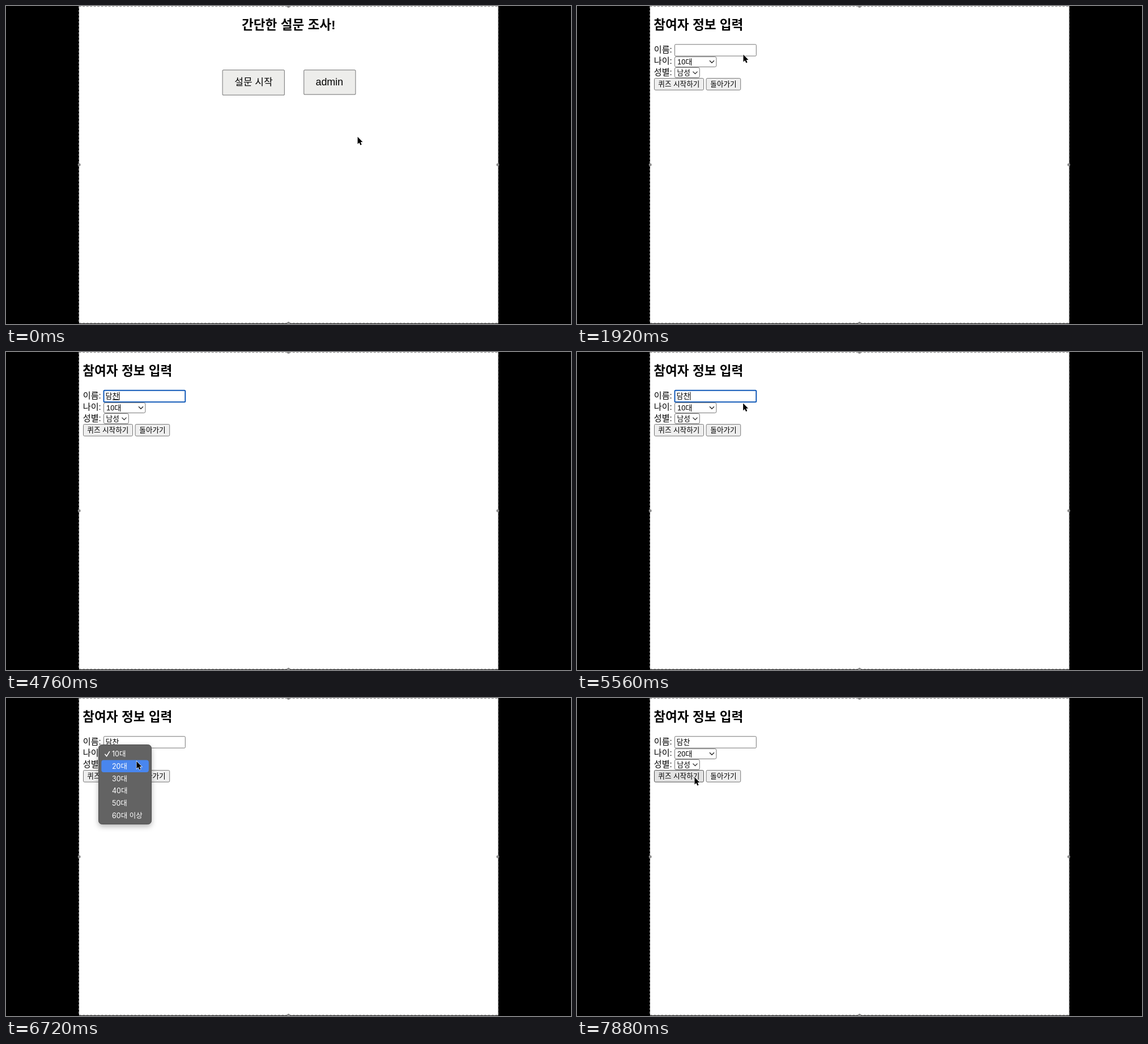
Recreate the animation shown at these times as an HTML page. Size 997 px wide and 561 px high, loop 8000 ms.

```html
<!DOCTYPE html>
<html lang="ko">
<head>
<meta charset="utf-8">
<title>설문 조사</title>
<style>
html, body { margin: 0; width: 100%; height: 100%; overflow: hidden; background: #000; }
svg { display: block; width: 997px; height: 561px; }
text { font-family: "Liberation Sans", "Noto Sans CJK KR", "Noto Sans CJK JP", sans-serif; white-space: pre; }
.head { font-size: 22.6px; font-weight: 700; }
.label { font-size: 15.1px; }
.big { font-size: 17px; }
.small { font-size: 12.6px; }
.num { font-size: 13px; }
.btn { fill: #efefef; stroke: #767676; }
.bigbtn { fill: #ededeb; stroke: #8a8a8a; stroke-width: 1.2; }
.btn.hover, .bigbtn.hover { fill: #e3e3e3; stroke: #505050; }
.btn.press, .bigbtn.press { fill: #f5f5f5; stroke: #8d8d8d; }
.field { fill: #fff; stroke: #767676; }
.field.ring { stroke: #1059b8; stroke-width: 2; }
.chev { fill: none; stroke: #222; stroke-width: 1.3; }
.frame { fill: none; stroke: #989898; stroke-width: 1.3; stroke-dasharray: 4 2.5; }
#menu rect.panel { fill: #636363; stroke: #505050; filter: drop-shadow(0 4px 5px rgba(0,0,0,.28)); }
#menu text { font-family: Inter, "Noto Sans CJK KR", "Noto Sans CJK JP", sans-serif; font-size: 12.5px; fill: #fff; }
</style>
</head>
<body>
<svg viewBox="0 0 997 561">
  <rect x="129" width="739.5" height="560" fill="#fff"/>
  <rect class="frame" x="128.7" y=".5" width="739.8" height="559"/>
  <g fill="#8c8c8c">
    <circle cx="498.5" cy=".5" r="2.5"/><circle cx="498.5" cy="559.5" r="2.5"/>
    <circle cx="129.2" cy="280" r="2.5"/><circle cx="867.8" cy="280" r="2.5"/>
  </g>

  <g id="home">
    <text class="head" x="416" y="41">간단한 설문 조사!</text>
    <rect id="start" class="bigbtn" x="382.1" y="112.8" width="109.3" height="44.4" rx="2"/>
    <text class="big" x="403.3" y="140">설문 시작</text>
    <rect class="bigbtn" x="525.6" y="112.8" width="91.2" height="43.4" rx="2"/>
    <text x="546.5" y="140" font-size="17.8">admin</text>
  </g>

  <g id="form">
    <text class="head" x="135.3" y="40.5">참여자 정보 입력</text>
    <text class="label" x="135.8" y="81.6">이름:</text>
    <text class="label" x="135.8" y="102.4">나이:</text>
    <text class="label" x="135.8" y="122">성별:</text>
    <rect id="name" class="field" x="172.5" y="67.8" width="143.8" height="20.4" rx="1.5"/>
    <text id="typed" class="num" x="175.6" y="81.8"></text>
    <path id="under" stroke="#000" stroke-width="1.2"/>
    <path id="caret" stroke="#000"/>
    <rect id="age" class="field" x="172.5" y="89.6" width="73.4" height="17.8" rx="2.5"/>
    <text id="ageText" class="num" x="177" y="102.7">10대</text>
    <path class="chev" d="M234 96.3l4 4 4-4"/>
    <rect class="field" x="172.5" y="108.6" width="43.8" height="17.8" rx="2.5"/>
    <text class="small" x="176.6" y="122">남성</text>
    <path class="chev" d="M204.5 115.6l4 4 4-4"/>
    <rect id="quiz" class="btn" x="136.5" y="127.6" width="87" height="20.6" rx="2"/>
    <text class="small" x="143.3" y="141.8">퀴즈 시작하기</text>
    <rect class="btn" x="228.1" y="127.6" width="60.6" height="20.6" rx="2"/>
    <text class="small" x="235.3" y="141.8">돌아가기</text>
  </g>

  <g id="menu">
    <rect class="panel" x="163.5" y="82.5" width="93" height="140" rx="6"/>
    <rect id="pick" x="168.3" width="83.6" height="21.7" rx="4" fill="#4986ee"/>
    <path d="M174.8 99.3l2.8 3.4 5-8" fill="none" stroke="#fff" stroke-width="1.6" stroke-linecap="round"/>
  </g>

  <path id="cursor" d="M.5.8V13.6L3.4 10.9 5.4 15.4 7.6 14.4 5.7 10H9.4Z" stroke="#fff" stroke-width="1.3" paint-order="stroke"/>
</svg>
<script>
const LOOP = 8000, STEP = 40;
const $ = id => document.getElementById(id);
const ui = {};
for (const el of document.querySelectorAll('[id]')) ui[el.id] = el;

const ages = ['10대', '20대', '30대', '40대', '50대', '60대 이상'];
ages.forEach((label, i) => {
  const row = document.createElementNS('http://www.w3.org/2000/svg', 'text');
  row.setAttribute('x', 187);
  row.setAttribute('y', 103.1 + i * 21.7);
  row.textContent = label;
  ui.menu.append(row);
});

// time, x, y of the pointer tip
const path = [
  [480, 620, 230], [960, 460, 143],
  [1760, 460, 143], [1920, 293, 85], [2160, 284, 82],
  [2480, 284, 82], [2560, 284, 80],
  [5200, 284, 80], [5400, 314, 86], [5840, 243, 98],
  [6160, 243, 98], [6400, 230, 111],
  [6760, 230, 111], [7040, 213, 108],
  [7360, 213, 108], [7640, 207, 139]
];

// time, text in the name field
const typing = [
  [0, ''], [3720, 'ㄷ'], [4280, '다'], [4400, '담'],
  [4560, '담ㅊ'], [4640, '담차'], [4760, '담찬']
];

const within = (t, a, b) => t >= a && t < b;
const show = (el, on) => el.style.display = on ? '' : 'none';

function pointer(t) {
  const i = path.findIndex(p => p[0] > t);
  if (i === 0) return path[0].slice(1);
  if (i < 0) return path[path.length - 1].slice(1);
  const [t0, x0, y0] = path[i - 1], [t1, x1, y1] = path[i];
  const k = (t - t0) / (t1 - t0), e = k * k * (3 - 2 * k);
  return [x0 + (x1 - x0) * e, y0 + (y1 - y0) * e];
}

function button(el, kind, hover, press) {
  el.setAttribute('class', kind + (press ? ' press' : hover ? ' hover' : ''));
}

function render(t) {
  const [x, y] = pointer(t);
  ui.cursor.setAttribute('transform', `translate(${x} ${y})`);
  show(ui.cursor, !within(t, 3800, 5240));

  const onForm = t >= 1400;
  show(ui.home, !onForm);
  show(ui.form, onForm);
  button(ui.start, 'bigbtn', x < 491 && y < 157, within(t, 1200, 1320));
  button(ui.quiz, 'btn', t > 7360 && y > 127, within(t, 7800, 7880));

  const text = typing.filter(s => s[0] <= t).pop()[1];
  const end = 175.6 + text.length * 11.96;
  ui.typed.textContent = text;
  show(ui.under, text && t < 5240);
  ui.under.setAttribute('d', `M${end - 11.5} 84.2H${end}`);
  ui.caret.setAttribute('d', `M${end + .4} 70.5V85`);
  show(ui.caret, within(t, 2160, 2640) || within(t, 3120, 3600) || within(t, 3720, 5800));

  ui.name.classList.toggle('ring', within(t, 2160, 5800));
  ui.age.classList.toggle('ring', within(t, 5800, 7800));
  ui.ageText.textContent = ages[t >= 6800 ? 1 : 0];

  show(ui.menu, within(t, 5840, 7040));
  ui.menu.style.opacity = t < 6800 ? 1 : Math.max(0, 1 - (t - 6760) / 280);
  ui.pick.setAttribute('y', y > 109 || t > 6400 ? 109.4 : 87.7);
  show(ui.pick, !within(t, 6640, 6720));
}

function tick() {
  const t = performance.now() % LOOP;
  render(Math.floor(t / STEP) * STEP);
  requestAnimationFrame(tick);
}
tick();
</script>
</body>
</html>
```
